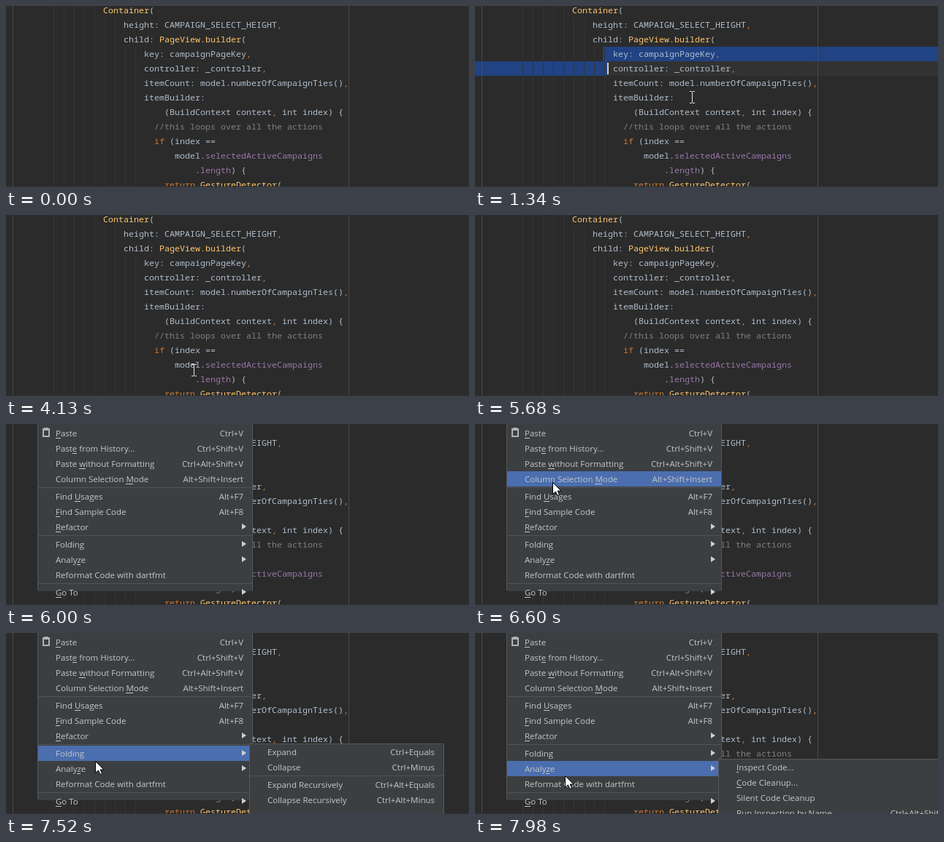
These frames come from a looping animation (634x249 px, 8 s). An HTML page with a canvas:

```html
<!DOCTYPE html>
<html lang="en">
<head>
<meta charset="utf-8">
<title>Code editor</title>
<style>
  html, body { margin: 0; width: 100%; height: 100%; overflow: hidden; background: #2b2b2b; }
  canvas { display: block; }
</style>
</head>
<body>
<canvas id="stage" width="634" height="249"></canvas>
<script>
const ctx = document.getElementById('stage').getContext('2d');
const W = 634, H = 249, LOOP = 8000;
const STEP = 76.7;                  // ms between pointer updates
const BLINK = 385;                  // half a caret blink
const HOVER = 200;                  // delay before a submenu opens
const MENU_AT = 6000, HOVER_AT = 6380;
const LINE = 20, CHAR = 7;          // code grid
const ITEM = 21, GAP = 3, PAD = 25; // menu grid
const CODE_FONT = '11.667px "Noto Sans Mono", monospace';
const MENU_FONT = '11.5px "Open Sans", "Noto Sans", sans-serif';

const CODE = `
                   Container(
                       height: CAMPAIGN_SELECT_HEIGHT,
                       child: PageView.builder(
                           key: campaignPageKey,
                           controller: _controller,
                           itemCount: model.numberOfCampaignTies(),
                           itemBuilder:
                               (BuildContext context, int index) {
                             //this loops over all the actions
                             if (index ==
                                 model.selectedActiveCampaigns
                                     .length) {
                               return GestureDetector(`.split('\n').slice(1);

const TEXT = '#b0bdcb';
const SYNTAX = [
  [/\/\/.*/g, '#808080'],
  [/\b(if|return)\b|,/g, '#cc7832'],
  [/Container|PageView\.builder|GestureDetector/g, '#ffc66d'],
  [/selectedActiveCampaigns|length/g, '#9876aa']
];

// "_" marks the mnemonic, "|" the shortcut, ">" a submenu, "-" a separator.
const MENU = [
  'Copy|Ctrl+C', '_Paste|Ctrl+V', 'Past_e from History...|Ctrl+Shift+V',
  'Paste _without Formatting|Ctrl+Alt+Shift+V', 'Column Selection _Mode|Alt+Shift+Insert', '-',
  'Find _Usages|Alt+F7', '_Find Sample Code|Alt+F8', '_Refactor|>', '-',
  'Folding|>', 'Analy_ze|>', 'Reformat Code with dartfmt|', '-',
  '_Go To|>', 'Generate...|Alt+Insert'
];
const SUBMENUS = {
  Refactor: { right: 590, items: [
    '_Rename...|Shift+F6', '-', '_Move File...|F6', '_Copy File...|F5', '-',
    'Introduce _Variable...|Ctrl+Alt+V', 'Introduce _Constant...|Ctrl+Alt+C', '-'
  ] },
  Folding: { right: 600, items: [
    'Expand|Ctrl+Equals', 'Collapse|Ctrl+Minus', '-',
    'Expand Recursively|Ctrl+Alt+Equals', 'Collapse Recursively|Ctrl+Alt+Minus'
  ] },
  Analyze: { right: 662, items: [
    '_Inspect Code...|', '_Code Cleanup...|', 'Silent Code Cleanup|',
    '_Run Inspection by Name...|Ctrl+Alt+Shift+I'
  ] }
};

// Stacks menu entries downwards from top.
function layout(entries, top) {
  return entries.map(entry => {
    const [raw, keys] = entry.split('|');
    const row = { raw, keys, top, label: raw.replace('_', '') };
    top += raw === '-' ? GAP : ITEM;
    return row;
  });
}
const menuRows = layout(MENU, 2 - ITEM);

// Pointer moves along curves: start, end, target, optional bend.
const MOVES = [
  { start: 70, end: 500, to: [196, 72] },
  { start: 730, end: 960, to: [182, 86] },
  { start: 1040, end: 1420, to: [302, 121], bend: [296, 139] },
  { start: 1570, end: 1800, to: [210, 152] },
  { start: 2050, end: 2810, to: [310, 144], bend: [430, 143] },
  { start: 2890, end: 3280, to: [304, 198], bend: [245, 170] },
  { start: 3500, end: 3500, to: [304, 192] },
  { start: 3670, end: 4440, to: [236, 200], bend: [262, 230] },
  { start: 4520, end: 5130, to: [43, -20] },
  { start: 6380, end: 6600, to: [106, 80] },
  { start: 6680, end: 7060, to: [120, 156], bend: [112, 150] },
  { start: 7140, end: 7980, to: [123, 196] }
];

const CLICKS = [
  { at: 730, col: 25, row: 3 },
  { at: 960, col: 26, row: 4 },
  { at: 1420, col: 39, row: 6 },
  { at: 3500, col: 41, row: 9 }
];

function pointer(t) {
  let pos = [560, 262];
  for (const { start, end, to, bend } of MOVES) {
    if (t < start) break;
    const steps = Math.round((end - start) / STEP) + 1;
    const p = Math.min(1, (1 + Math.floor((t - start) / STEP + 0.15)) / steps);
    pos = pos.map((from, i) => {
      const mid = bend ? bend[i] : (from + to[i]) / 2;
      return from * (1 - p) ** 2 + 2 * mid * p * (1 - p) + to[i] * p * p;
    });
  }
  return pos;
}

function hotRow(t) {
  if (t < HOVER_AT) return null;
  const y = pointer(t)[1];
  return menuRows.filter(row => row.raw !== '-' && row.top < y - 1.5).pop();
}

function box(x, y, w, h, color) {
  ctx.fillStyle = color;
  ctx.fillRect(x, y, w, h);
}

function shape(points, fill, stroke) {
  ctx.beginPath();
  points.forEach(([x, y]) => ctx.lineTo(x, y));
  ctx.closePath();
  ctx.fillStyle = fill;
  ctx.fill();
  if (!stroke) return;
  ctx.strokeStyle = stroke;
  ctx.lineWidth = 1;
  ctx.stroke();
}

function drawLine(line, i) {
  const colors = Array(line.length).fill(TEXT);
  for (const [pattern, color] of SYNTAX) {
    for (const m of line.matchAll(pattern)) colors.fill(color, m.index, m.index + m[0].length);
  }
  [...line].forEach((char, col) => {
    ctx.fillStyle = colors[col];
    ctx.fillText(char, col * CHAR, 10 + i * LINE);
  });
}

function drawEditor(t) {
  const click = CLICKS.filter(c => t >= c.at).pop();
  const top = click && click.row * LINE - 4;
  box(0, 0, W, H, '#2b2b2b');
  if (click && t < 3500) box(0, top, W, LINE, '#323232');
  if (t >= 960 && t < 1420) {
    box(175, top - LINE, W - 175, LINE, '#214283');
    box(0, top, 182, LINE, '#214283');
  }
  for (let x = 65; x <= 177; x += 14) {
    const y = x < 133 ? 0 : x < 161 ? 16 : 56;
    box(x, y, 1, H - y, '#353535');
  }
  for (const x of [9, 469]) box(x, 0, 1, H, '#4b4b4b');
  ctx.font = CODE_FONT;
  CODE.forEach(drawLine);
  if (click && Math.floor((t - click.at) / BLINK) % 2 === 0) {
    box(click.col * CHAR - 1, top + 2, 2, 16, '#d0d0d0');
  }
  box(0, H - 1, W, 1, '#323232');
}

function drawItem({ raw, label, keys, top }, x, right) {
  const mark = raw.indexOf('_'), base = top + 15;
  ctx.fillStyle = '#c6c6c6';
  ctx.fillText(label, x, base);
  if (mark >= 0) {
    const left = ctx.measureText(label.slice(0, mark)).width;
    const width = ctx.measureText(label[mark]).width;
    ctx.fillRect(Math.round(x + left), base + 2, Math.round(width), 1);
  }
  if (keys === '>') {
    shape([[right - 2, base - 9], [right + 4, base - 5], [right - 2, base - 1]], '#d0d0d0');
  } else {
    ctx.textAlign = 'right';
    ctx.fillText(keys, right, base);
    ctx.textAlign = 'left';
  }
}

function drawPanel(rows, left, right, hot) {
  const top = rows[0].top - 1, inner = right - left - 2;
  box(left, top, right - left, H, '#555758');
  box(left + 1, top + 1, inner, H, '#3c3f41');
  ctx.font = MENU_FONT;
  for (const row of rows) {
    if (row === hot) box(left + 1, row.top, inner, ITEM, '#4b6eaf');
    if (row.raw === '-') box(left + 1, row.top + 1, inner, 1, '#515355');
    else drawItem(row, left + PAD, right - 13);
  }
}

function drawClipboard() {
  ctx.strokeStyle = '#afb1b3';
  ctx.lineWidth = 2;
  ctx.strokeRect(51, 7, 8, 10);
  box(52, 5, 6, 4, '#afb1b3');
}

function drawMenu(t) {
  const hot = hotRow(t);
  drawPanel(menuRows, 43, 338, hot);
  drawClipboard();
  const sub = hot && hot === hotRow(t - HOVER) && SUBMENUS[hot.label];
  if (sub) drawPanel(layout(sub.items, hot.top - 2), 333, sub.right);
}

function drawBeam(x, y) {
  box(x, y - 7, 1, 15, '#e6e6e6');
  for (const end of [y - 8, y + 8]) {
    box(x - 3, end, 3, 1, '#e6e6e6');
    box(x + 1, end, 3, 1, '#e6e6e6');
  }
}

function drawArrow(x, y) {
  const outline = [[0, 0], [0, 16], [4, 12.5], [6.5, 18], [9, 17], [6.7, 11.5], [11.5, 11.5]];
  shape(outline.map(([dx, dy]) => [x + dx + 0.5, y + dy + 0.5]), '#ffffff', '#000000');
}

function draw(t) {
  const [x, y] = pointer(t).map(Math.round);
  drawEditor(t);
  if (t >= MENU_AT) drawMenu(t);
  if (t >= HOVER_AT) drawArrow(x, y);
  else drawBeam(x, y);
}

const begin = performance.now();
function tick() {
  draw((performance.now() - begin) % LOOP);
  requestAnimationFrame(tick);
}
tick();
</script>
</body>
</html>
```
